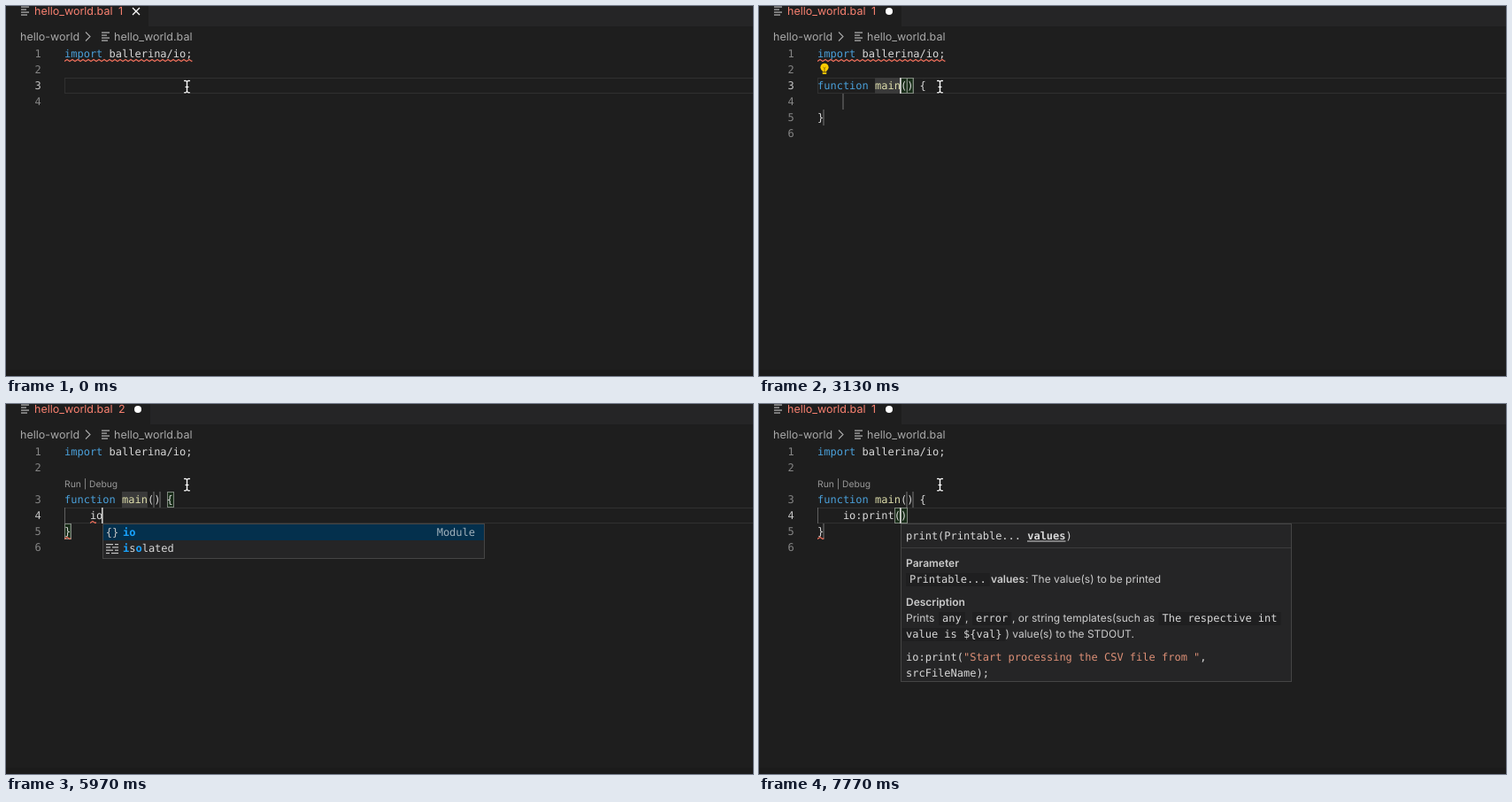
An HTML page with a canvas for the animation above (8000 ms loop, 844x418 px).

```html
<!DOCTYPE html>
<html lang="en">
<head>
<meta charset="utf-8">
<title>Editor completion</title>
<style>
html, body { margin: 0; width: 100%; height: 100%; overflow: hidden; background: #1e1e1e; }
canvas { display: block; }
</style>
</head>
<body>
<canvas id="stage" width="844" height="418"></canvas>
<script>
const ctx = document.getElementById('stage').getContext('2d');
const LOOP = 8000, LEFT = 66, CHAR = 7.224, ROW = 18;
const MONO = '12px "DejaVu Sans Mono", monospace';
const BOLD = 'bold ' + MONO;
const UI = '12.5px Inter, sans-serif';
const DOC = '12px Inter, sans-serif';
const DOC_BOLD = '600 12px Inter, sans-serif';
const C = {
  bg: '#1e1e1e', bar: '#252526', text: '#d8d8d8', key: '#4aa0da', name: '#dcdcaa',
  num: '#858585', error: '#f88070', wave: '#f0705c', match: '#18a3ff', edge: '#454545',
  purple: '#b180d7', orange: '#ee9d28', blue: '#75beff', string: '#dc8f76'
};

const menus = {
  start: { detail: 'Snippet', items: [
    ['snippet', '*f*unction'], ['snippet', '*f*oreach'], ['snippet', '*f*ork'],
    ['keyword', '*f*ail'], ['keyword', '*f*alse'], ['keyword', '*f*inal'],
    ['keyword', '*f*loat'], ['keyword', '*f*rom'], ['keyword', '*f*unction']] },
  module: { detail: 'Module', items: [['braces', '*io*'], ['snippet', '*i*s*o*lated']] },
  members: { detail: 'Function', items: [
    ['cube', 'fileReadBytes(string path)'], ['cube', 'fileReadCsv(string path)'],
    ['cube', 'fileReadJson(string path)'], ['cube', 'fileReadLines(string path)'],
    ['cube', 'fileReadString(string path)'], ['cube', 'fileReadXml(string path)'],
    ['cube', 'openReadableFile(string path)'], ['cube', 'openWritableFile(string path)'],
    ['cube', 'print(Printable... values)'], ['cube', 'println(Printable... values)'],
    ['cube', 'readln(any? a)'], ['enum', 'Printable']] },
  print: { detail: 'Function', items: [
    ['cube', '*p*rint(Printable... values)'], ['cube', '*p*rintln(Printable... values)'],
    ['enum', '*P*rintable'], ['link', '*P*rintableRawTemplate'],
    ['member', 'EXTERNAL_*P*ARSED_ENTITY']] }
};

// Each entry changes part of the editor state; caret is [line, column].
const steps = [
  [0, { count: 1, line: 3, caret: null, waves: ['import'] }],
  [290, { dirty: true, typed: 'f', caret: [3, 1] }],
  [440, { menu: 'start', count: 2 }],
  [890, { caret: null }],
  [1340, { menu: null, count: 3, word: 'name', selected: true, wordBox: true, bodyMark: true, caret: [3, 13] }],
  [1490, { count: 1 }],
  [1790, { caret: null }],
  [2240, { caret: [3, 13] }],
  [2690, { word: 'm', selected: false, caret: [3, 10], pair: 'round' }],
  [2840, { word: 'ma', caret: [3, 11] }],
  [2990, { word: 'main', caret: [3, 13] }],
  [3130, { lamp: true }],
  [3280, { lens: true }],
  [3430, { count: 2, waves: ['import', 'head', 'end'] }],
  [3730, { caret: null }],
  [4170, { caret: [3, 13] }],
  [4620, { caret: [3, 14], lamp: false }],
  [4770, { caret: [3, 15] }],
  [4920, { line: 4, caret: [4, 4], pair: null }],
  [5070, { pair: 'curly', waves: ['import', 'head', 'indent', 'end'] }],
  [5370, { caret: null }],
  [5820, { body: 'i', caret: [4, 5], guide: true, bodyMark: false }],
  [5970, { body: 'io', caret: [4, 6], menu: 'module', waves: ['first', 'end'] }],
  [6120, { body: 'io:', caret: [4, 7], menu: null }],
  [6270, { menu: 'members' }],
  [6420, { body: 'io:p', caret: [4, 8] }],
  [6570, { menu: 'print', waves: ['end'] }],
  [6720, { count: 3 }],
  [6870, { waves: ['body', 'end'] }],
  [7320, { caret: null }],
  [7620, { body: 'io:print()', caret: [4, 13], menu: null, pair: 'call', wordBox: false, waves: ['end'] }],
  [7770, { count: 1, help: true }]
];

const stateAt = t => Object.assign({}, ...steps.filter(s => s[0] <= t).map(s => s[1]));
const colX = col => LEFT + col * CHAR;

function rect(x, y, w, h, color) {
  ctx.fillStyle = color;
  ctx.fillRect(x, y, w, h);
}
function frame(x, y, w, h, color) {
  ctx.strokeStyle = color;
  ctx.lineWidth = 1;
  ctx.strokeRect(x + .5, y + .5, w - 1, h - 1);
}
function text(s, x, y, color = C.text, font = MONO) {
  ctx.font = font;
  ctx.fillStyle = color;
  ctx.fillText(s, x, y);
}
function path(points, color, width = 1, closed = false) {
  ctx.beginPath();
  points.forEach(([x, y]) => ctx.lineTo(x, y));
  if (closed) ctx.closePath();
  ctx.strokeStyle = color;
  ctx.lineWidth = width;
  ctx.stroke();
}
function disc(x, y, r, color) {
  ctx.beginPath();
  ctx.arc(x, y, r, 0, Math.PI * 2);
  ctx.fillStyle = color;
  ctx.fill();
}
function ring(x, y, r, color) {
  ctx.beginPath();
  ctx.arc(x, y, r, 0, Math.PI * 2);
  ctx.strokeStyle = color;
  ctx.lineWidth = 1.2;
  ctx.stroke();
}

function wave(x, y, w) {
  ctx.save();
  ctx.beginPath();
  ctx.rect(x, y - 1, w, 5);
  ctx.clip();
  const points = [];
  for (let i = 0; i <= w + 3; i += 3) points.push([x + i, y + (i % 2 ? .5 : 2.5)]);
  path(points, C.wave, 1.1);
  ctx.restore();
}

function fileIcon(x, y) {
  [9, 6, 9, 7].forEach((w, i) => rect(x, y + i * 3 - .5, w, 1.1, '#c5c5c5'));
}

function header(s) {
  const edge = s.count === 1 ? 161 : 163;
  rect(0, 0, 844, 23, C.bar);
  rect(0, 0, edge, 23, C.bg);
  fileIcon(17, 1);
  text('hello_world.bal', 32, 10, C.error, UI);
  text(s.count, 127, 10, C.error, UI);
  const x = edge - 14;
  if (s.dirty) disc(x, 6, 4, '#fff');
  else {
    path([[x - 4, 2], [x + 4, 10]], '#fff', 1.2);
    path([[x + 4, 2], [x - 4, 10]], '#fff', 1.2);
  }
  text('hello-world', 16, 39, '#a9a9a9', UI);
  path([[90, 29.5], [95, 34.5], [90, 39.5]], '#a9a9a9', 1.1);
  fileIcon(108, 30);
  text('hello_world.bal', 122, 39, '#a9a9a9', UI);
}

function lamp() {
  disc(74, 69.3, 4.6, '#ffcc00');
  rect(71.8, 72, 4.4, 5, '#ffcc00');
  rect(72, 74.4, 4, .8, C.bg);
  path([[72.4, 69], [74, 70.5], [75.6, 69]], '#6b5500', .8);
  path([[74, 70.5], [74, 74]], '#6b5500', .8);
}

function editor(s) {
  const top = n => 45 + (n - 1) * ROW + (s.lens && n > 2 ? ROW : 0);
  const base = n => top(n) + 13;
  const bracket = (n, col) => {
    const x = Math.round(colX(col)), w = Math.round(colX(col + 1)) - x + 1;
    rect(x, top(n), w, 18, 'rgba(0,100,0,.2)');
    frame(x, top(n), w, 18, '#80887f');
  };
  const mark = (n, col) => rect(Math.round(colX(col)) - 1, top(n), 2, 18, '#4a4a4a');

  if (!s.selected) frame(LEFT, top(s.line), 800, 18, '#303030');

  const count = s.word ? 6 : 4;
  for (let n = 1; n <= count; n++)
    text(n, 32.6, base(n), n === s.line ? '#c6c6c6' : C.num);

  if (s.word) {
    const end = 9 + s.word.length;
    const w = s.word.length * CHAR;
    if (s.selected) rect(colX(9), top(3), w, 18, '#2f5680');
    else if (s.wordBox) rect(colX(9), top(3), w, 18, '#3a3a3a');
    mark(3, end + 1);
    mark(3, end + 2);
    if (s.bodyMark) mark(4, 4);
    mark(5, 1);
    if (s.lens) rect(LEFT, top(4), 1, 18, s.guide ? '#606060' : '#363636');
    if (s.pair === 'round') { bracket(3, end); bracket(3, end + 1); }
    if (s.pair === 'curly') { bracket(3, end + 3); bracket(5, 0); }
    if (s.pair === 'call') { bracket(4, 12); bracket(4, 13); }
    text('function', LEFT, base(3), C.key);
    text(s.word, colX(9), base(3), C.name);
    text('() {', colX(end), base(3));
    text(s.body || '', colX(4), base(4));
    text('}', LEFT, base(5));
  } else text(s.typed || '', LEFT, base(3));

  text('import', LEFT, base(1), C.key);
  text('ballerina/io;', colX(7), base(1));
  if (s.lens) text('Run | Debug', LEFT, 94, '#999', '10.3px Inter, sans-serif');

  const spans = { import: [1, 0, 20], head: [3, 0, 17], indent: [4, 0, 4],
    first: [4, 4, 1], body: [4, 4, 4], end: [5, 0, 1] };
  s.waves.forEach(k => {
    const [n, col, len] = spans[k];
    wave(colX(col), top(n) + 15, len * CHAR);
  });
  if (s.lamp) lamp();
  if (s.caret) rect(Math.round(colX(s.caret[1])) - 1, top(s.caret[0]), 1.6, 18, '#d0d0ce');
}

const icons = {
  braces(x, y) { text('{}', x - 7.2, y + 4, '#c5c5c5'); },
  keyword(x, y) { icons.snippet(x, y); },
  snippet(x, y) {
    [[-7, 8], [-7, 5], [-7, 8], [-7, 4]].forEach(([dx, w], i) => {
      rect(x + dx, y - 5 + i * 3.3, w, 1.2, '#c5c5c5');
      rect(x + dx + w + 2, y - 5 + i * 3.3, 12 - w, 1.2, '#c5c5c5');
    });
  },
  cube(x, y) {
    path([[x, y - 6], [x + 5.5, y - 3], [x + 5.5, y + 3], [x, y + 6], [x - 5.5, y + 3], [x - 5.5, y - 3]], C.purple, 1.1, true);
    path([[x - 5.5, y - 3], [x, y], [x + 5.5, y - 3]], C.purple, 1.1);
    path([[x, y], [x, y + 6]], C.purple, 1.1);
  },
  enum(x, y) { icons.boxes(x, y, C.orange); },
  member(x, y) { icons.boxes(x, y, C.blue); },
  boxes(x, y, color) {
    frame(x - 1, y - 6, 8, 8, color);
    rect(x + 1, y - 4, 4, 1, color);
    rect(x + 1, y - 1, 4, 1, color);
    rect(x - 7, y - 1, 8, 7, C.bar);
    frame(x - 7, y - 1, 8, 7, color);
    rect(x - 5, y + 2, 4, 1, color);
  },
  link(x, y) {
    disc(x - 5, y, 1.9, C.blue);
    path([[x - 5, y], [x + 1, y]], C.blue, 1.2);
    ring(x + 3.7, y, 2.8, C.blue);
  }
};

function menu(s) {
  const { detail, items } = menus[s.menu];
  const col = { start: 1, module: 6, members: 7, print: 8 }[s.menu];
  const x = Math.round(colX(col)), y = s.lens ? 135 : 99;
  const w = 432, h = items.length * ROW + 4;
  rect(x, y, w, h, C.bar);
  frame(x, y, w, h, C.edge);
  rect(x + 1, y + 1, w - 2, ROW, '#04304d');
  items.forEach(([icon, label], i) => {
    const mid = y + 10 + i * ROW;
    icons[icon](x + 11, mid);
    let tx = x + 23;
    label.split('*').forEach((part, k) => {
      text(part, tx, mid + 4, k % 2 ? C.match : C.text, k % 2 ? BOLD : MONO);
      tx += part.length * CHAR;
    });
  });
  text(detail, x + 421 - detail.length * CHAR, y + 14, '#a0b0bb');
}

function help() {
  const chip = (s, x, y) => {
    rect(x - 4, y - 11, s.length * CHAR + 8, 15, '#1f1f20');
    text(s, x, y);
  };
  rect(160, 135, 442, 179, C.bar);
  frame(160, 135, 442, 179, C.edge);
  text('print(Printable... ', 166, 153);
  text('values', 303.2, 153, C.text, BOLD);
  rect(303, 154.5, 43.5, 1, C.text);
  text(')', 346.6, 153);
  rect(161, 162, 440, 1, '#3c3c3c');

  const say = (s, x, y, font = DOC) => text(s, x, y, '#cccccc', font);
  say('Parameter', 166, 184, DOC_BOLD);
  chip('Printable...', 170, 202);
  say('values', 262, 202, DOC_BOLD);
  say(': The value(s) to be printed', 301, 202);
  say('Description', 166, 228, DOC_BOLD);
  say('Prints', 166, 246);
  chip('any', 207, 246);
  say(',', 233, 246);
  chip('error', 245, 246);
  say(', or string templates(such as', 286, 246);
  chip('The respective int', 455.5, 246);
  chip('value is ${val}', 166, 264);
  say(') value(s) to the STDOUT.', 278.5, 264);
  text('io:print(', 166, 290);
  text('"Start processing the CSV file from "', 166 + 9 * CHAR, 290, C.string);
  text(',', 166 + 46 * CHAR, 290);
  text('srcFileName);', 166, 308);
}

function pointer() {
  const x = 204.5;
  [['#000', 3], ['#fff', 1.3]].forEach(([color, w]) => {
    path([[x - 3.5, 84.5], [x - 1, 84.5], [x, 86], [x, 96], [x - 1, 97.8], [x - 3.5, 97.8]], color, w);
    path([[x + 3.5, 84.5], [x + 1, 84.5], [x, 86], [x, 96], [x + 1, 97.8], [x + 3.5, 97.8]], color, w);
    path([[x - 2, 91.5], [x + 2, 91.5]], color, w);
  });
}

function draw(t) {
  const s = stateAt(t);
  ctx.textRendering = 'geometricPrecision';
  rect(0, 0, 844, 418, C.bg);
  rect(0, 411, 844, 7, '#1b1b1b');
  header(s);
  editor(s);
  if (s.menu) menu(s);
  if (s.help) help();
  pointer();
}

const began = performance.now();
function tick() {
  draw((performance.now() - began) % LOOP);
  requestAnimationFrame(tick);
}
tick();
</script>
</body>
</html>
```
